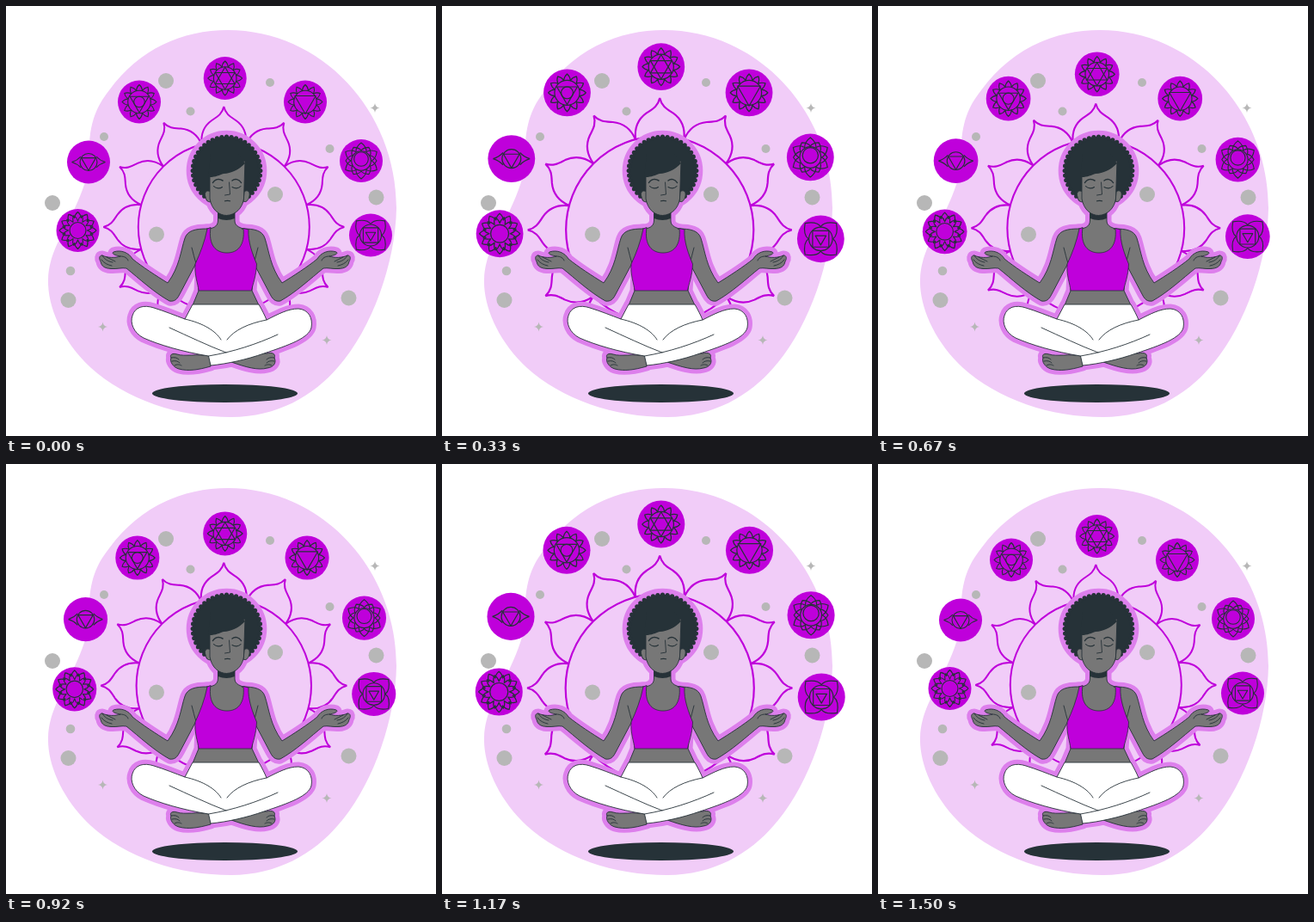
Write an HTML page that moves like this. It is 500 px wide and 500 px high and loops after 1540 ms.

```html
<!DOCTYPE html>
<html lang="en">
<head>
<meta charset="utf-8">
<title>Meditation</title>
<style>
html, body { margin: 0; width: 100%; height: 100%; overflow: hidden; background: #fff; }
svg { display: block; width: 100vw; height: 100vh; }
</style>
</head>
<body>
<svg id="stage" viewBox="0 0 500 500"></svg>
<script>
const DARK = '#263238', PURPLE = '#bf00db', SKIN = '#777777', DOT = '#b7b7b7';
const PALE = '#f1ccf8', GLOW = '#dd7fec';

const path = (d, attrs = '') => `<path d="${d}" ${attrs}/>`;
const circle = (x, y, r, attrs = '') => `<circle cx="${x}" cy="${y}" r="${r}" ${attrs}/>`;
const group = (attrs, body) => `<g ${attrs}>${body}</g>`;
const repeat = (n, fn) => Array.from({ length: n }, (_, i) => fn(i)).join('');
const polar = (r, deg) => {
  const a = deg * Math.PI / 180;
  return (r * Math.sin(a)).toFixed(2) + ' ' + (-r * Math.cos(a)).toFixed(2);
};

// ---------- backdrop ----------
const blob = path('M258 28C366 28 454 121 454 235C453 298 426 375 386 420C358 453 315 478 262 478C200 478 140 458 98 420C66 390 48 350 49 318C50 290 63 270 73 250C85 225 95 203 97 180C95 140 104 118 120 98C155 50 205 28 258 28Z', `fill="${PALE}"`);

const dots = [
  [186, 87, 9], [214.5, 122.5, 5], [307, 89, 5], [114, 152, 5], [376.5, 166, 5], [430.5, 222.5, 9],
  [313, 219, 9], [175, 265.5, 9], [54, 229, 9], [75, 308, 5.3], [72.5, 342, 9], [398.5, 339.5, 9]
].map(d => circle(...d)).join('');
const sparks = [[429, 118.5], [112.5, 373], [373, 388.5]]
  .map(([x, y]) => path(`M${x} ${y - 5.5}Q${x + .6} ${y - .6} ${x + 5.5} ${y}Q${x + .6} ${y + .6} ${x} ${y + 5.5}Q${x - .6} ${y + .6} ${x - 5.5} ${y}Q${x - .6} ${y - .6} ${x} ${y - 5.5}Z`)).join('');

// ---------- mandala ----------
const leaf = 'M-25.7 -96.1C-27 -108 -24 -117 -14 -124C-8 -128 -2 -131 0 -140C2 -131 8 -128 14 -124C24 -117 27 -108 25.7 -96.1';
const mandala = group(`transform="translate(253.3 257)" fill="none" stroke="${PURPLE}" stroke-width="2"`,
  circle(0, 0, 99.5) + repeat(12, i => i === 6 ? '' : path(leaf, `transform="rotate(${i * 30})"`)));

// ---------- chakra badges ----------
const ring = r => circle(0, 0, r);
const spikes = (n, inner, outer, turn = 0) => {
  const step = 360 / n, mid = inner + (outer - inner) * .6;
  return path('M' + polar(inner, turn - step / 2) + repeat(n, i => {
    const a = turn + i * step;
    return `Q${polar(mid, a - step * .36)} ${polar(outer, a)}Q${polar(mid, a + step * .36)} ${polar(inner, a + step / 2)}`;
  }) + 'Z');
};
const poly = (n, r, turn = 0) =>
  path('M' + Array.from({ length: n }, (_, i) => polar(r, turn + i * 360 / n)).join('L') + 'Z');
const down = r => poly(3, r, 180);
const crown = spikes(12, 13.5, 20) + ring(13.3);

const badges = [
  [83.5, 261, spikes(12, 15, 21.5) + spikes(12, 11, 18, 15) + ring(9.5)],
  [96, 181.5, path('M-19.5 0Q-13 -2 -9 -6.500M-19.5 0Q-13 2 -9 6.500M19.5 0Q13 -2 9 -6.500M19.5 0Q13 2 9 6.500') + ring(10) + down(9.8)],
  [155, 111.5, crown + down(12.5) + ring(6.3)],
  [254.7, 84, crown + down(13) + poly(3, 13)],
  [348, 111.5, crown + down(14)],
  [413, 180, spikes(6, 12, 21) + spikes(6, 12, 18, 30) + ring(11.3) + circle(0, -2, 8.3)],
  [424, 266.5, spikes(4, 13, 23.5, 45) + ring(12.5) + poly(4, 12.2, 45) + down(6.5)]
].map(([x, y, art]) => group(`transform="translate(${x} ${y})"`,
  circle(0, 0, 25, `fill="${PURPLE}"`) +
  group(`fill="none" stroke="${DARK}" stroke-width="1.1" stroke-linejoin="round"`, art))).join('');

// ---------- figure ----------
const mirror = 'transform="translate(509 0) scale(-1 1)"';
const arm = 'M234 259C220 259 211 261 208 270C203 285 202 303 188 322C175 314 158 303 147 294C143 287 134 283 125 286C122 288 127 290 133 291C127 293 118 293 112 290C108 290 108 294 110 297C111 303 115 305 122 305.5C129 306 135 304 140 305C155 317 172 333 190 343C196 344 199 341 202 335L221 299C228 290 234 277 236 262Z';
const torso = 'M246.5 240V250C246 257 240 259 233 259L226 290L224 331L217 348H294L286 331L288 300L282 260C273 259 266 256 266 250V240Z';
const pants = 'M217 347H294C298 354 301 360 303 365C317 358 328 352 340 352C352 353 357 363 355 374C352 386 330 394 300 404C280 411 258 416 238 418L235.500 407C205 402 178 394 160 386C148 380 144 368 147 360C150 350 160 347 172 351C185 355 197 360 208 364Z';
const footL = 'M237 407C222 404 208 408 199 405C193 403 190 406 192 409C190 413 194 420 201 422C212 425 224 423 238 419Z';
const footR = 'M268 412C280 408 293 403 303 404C310 402 314 405 312 409C315 415 311 420 304 421C293 424 279 420 262 414Z';
const face = 'M237 190V224C239 237 248 243.500 256.500 243.500C267 243 275 235 276.500 224L278 180Z';

const line = (d, w = .9) => path(d, `fill="none" stroke="${DARK}" stroke-width="${w}" stroke-linecap="round"`);
const skin = d => path(d, `fill="${SKIN}" stroke="${DARK}" stroke-width=".9" stroke-linejoin="round"`);

const glow = group(`fill="${GLOW}" stroke="${GLOW}" stroke-width="11" stroke-linejoin="round"`,
  [torso, arm, pants, footL, footR, face].map(d => path(d)).join('') + path(arm, mirror) + circle(256.5, 191.5, 41.3));

const creases = line('M216 281C218 288 219 294 221 299') + line('M133 291C138 291 141 293 142 296') +
  line('M112 290C114 294 118 297 124 298M111 295C114 299 118 301 123 302M117 292L127 297');
const limb = skin(arm) + creases;

const tank = path('M234 259L238 257.500C235 278 244 287 257 287C269 287 278 279 276 258.500L282 260C281 274 287 289 291.500 300C291 314 287 323 285.500 331H224C223 322 219 313 220 300C226 287 231 274 234 259Z',
  `fill="${PURPLE}" stroke="${DARK}" stroke-width=".8"`);

const legs = path(pants, `fill="#fff" stroke="${DARK}" stroke-width=".9"`) +
  line('M208 364C230 369 244 378 250 388M303 365C282 369 265 377 257 388') +
  line('M190 374C212 384 235 395 256 403M235.500 407C265 402 292 393 316 382');

const toes = line('M192 409C196 408 199 409 201 411M193 413C197 412 200 413 202 415M196 418C199 416 202 417 204 418') +
  line('M312 409C308 408 305 409 303 411M312 413C308 412 305 413 303 415M309 418C306 416 303 417 301 418');

const hair = group(`fill="${DARK}"`,
  circle(256.5, 191.5, 39.8) +
  repeat(44, i => {
    const [x, y] = polar(39.3, i * 360 / 44).split(' ').map(Number);
    return circle(256.5 + x, 191.5 + y, 2.6);
  }));
const fringe = path('M235 199C243 199.500 248 196.500 253 195C262 194.500 270 191 278 183L270 172H238Z', `fill="${DARK}"`);
const ears = skin('M238 216C233 213 230 217 232 222C233 227 236 229 239 227Z') +
  skin('M277 216C281 213 284 216 283 221C282 226 279 229 276 227Z');
const features = line('M240.500 205.500C243 201 248 200.500 252 203M263 203C266 200.500 271 201 273.500 205.500', 1.5) +
  line('M241.500 209.500C244 212.500 249 212.500 251.500 210.500M263 210.500C266 212.500 270.500 212.500 273 209.500', 1.1) +
  line('M259.500 205L260.500 219L254.500 220') + line('M254.500 226.800Q257.500 225.800 260.500 226.800', 1.2);

const figure = hair + skin(torso) + limb + group(mirror, limb) +
  path('M235 260H280L286 300L285 330H225L226 300Z', `fill="${SKIN}"`) +
  tank + skin(footL) + skin(footR) + toes + legs +
  path('M246.500 238H266V247Q256.500 251 246.500 247Z', `fill="${DARK}"`) +
  ears + skin(face) + fringe + features;

const stage = document.getElementById('stage');
stage.innerHTML = blob + group(`fill="${DOT}"`, dots + sparks) +
  group('id="aura"', mandala + badges) + glow +
  `<ellipse cx="254.5" cy="450.5" rx="84.5" ry="10.5" fill="${DARK}"/>` + figure;
const aura = document.getElementById('aura');

// ---------- motion ----------
const LOOP = 1540, STEP = 1000 / 24, GROW = .104, CX = 254, CY = 222;
// time, swell, slope per ms
const keys = [
  [0, 0, .0034], [130, .43, .003], [330, .92, .0016], [400, 1, 0], [540, .75, -.0031],
  [670, .32, -.003], [800, .09, 0], [920, .22, .0026], [1080, .74, .003], [1170, .977, .0012],
  [1210, 1, 0], [1500, 0, 0]
];

function swell(t) {
  const i = keys.findIndex(k => k[0] > t);
  if (i < 0) return 0;
  const [t0, a, m0] = keys[i - 1], [t1, b, m1] = keys[i];
  const d = t1 - t0, u = (t - t0) / d, v = 1 - u;
  return a * (1 + 2 * u) * v * v + m0 * d * u * v * v + b * u * u * (3 - 2 * u) - m1 * d * u * u * v;
}

function draw(now) {
  const t = Math.floor((now % LOOP + 5) / STEP) * STEP;
  const s = 1 + GROW * swell(t);
  aura.setAttribute('transform', `translate(${CX} ${CY}) scale(${s.toFixed(5)}) translate(${-CX} ${-CY})`);
}

const start = performance.now();
function tick() {
  draw(performance.now() - start);
  requestAnimationFrame(tick);
}
tick();
</script>
</body>
</html>
```
